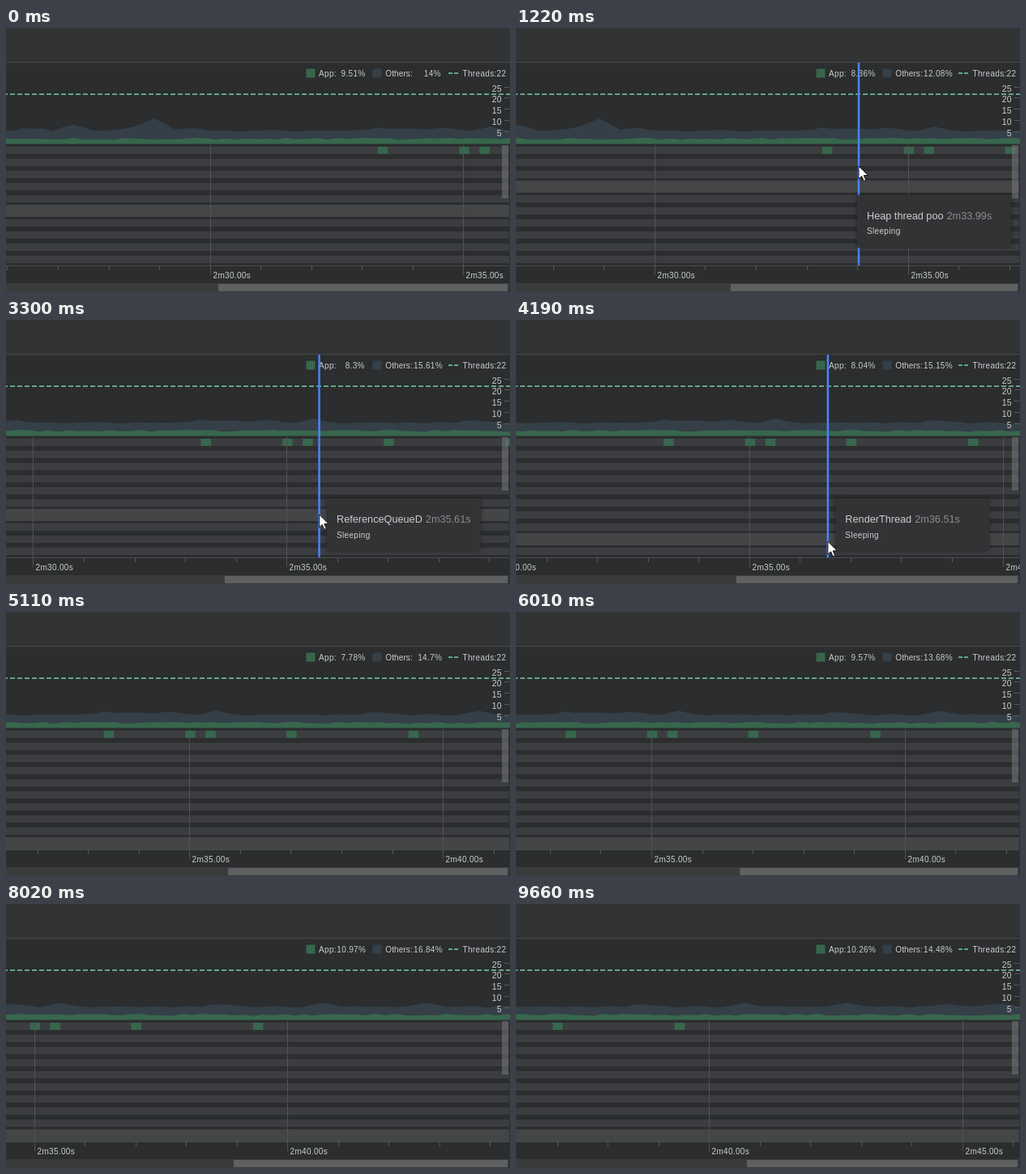
Animation, 622 px wide and 327 px high, one loop 9760 ms. Source, as an HTML page with a canvas:

```html
<!DOCTYPE html>
<html lang="en">
<head>
<meta charset="utf-8">
<title>Thread profiler</title>
<style>
html, body { margin: 0; width: 100%; height: 100%; overflow: hidden; background: #2b2d2e; }
canvas { display: block; }
</style>
</head>
<body>
<canvas id="stage" width="622" height="327"></canvas>
<script>
const ctx = document.getElementById('stage').getContext('2d');
const WIDTH = 622, HEIGHT = 327, LOOP = 9760;
const STEP = 58.9;                 // ms between picture changes
const SCROLL_SPEED = 0.06615;      // px per ms of playback
const SECOND = 62.55;              // px per second on the time axis
const MARK_35 = 564.4;             // where 2m35s starts
const BASE = 143.5, SAMPLE = 12.53;
const ROW_TOP = 144, ROW = 15, ROWS = 10;
const GREEN = '#37674d', OTHERS = '#353f48', DASH = '#62a583', TEXT = '#cbcdcf';

// Load peaks: sample number and rise in px.
const peaks = [[2, 4], [6, 9.5], [12, 7], [14, 18], [18, 4], [36, 4], [39, 4],
  [42, 4.5], [47, 6], [63, 4.5], [73, 4.5], [83, 6], [93, 5], [98, 4]];

// Time, App %, Others %.
const usage = [[0, 9.51, 14], [1200, 8.36, 12.08], [3200, 8.3, 15.61], [4800, 7.78, 14.7],
  [6800, 10.76, 13], [8000, 10.97, 16.84], [9600, 10.26, 14.48]];

// Time, cursor x, cursor y.
const pointerPath = [[180, 430, 240], [1000, 424, 217], [1220, 423, 171],
  [2200, 410, 180], [3300, 386.5, 241], [4650, 384, 292]];
const POINTER_START = 300, POINTER_END = 4650, HOVER_LAG = 120;

const activeSpans = [458.7, 559.3, 584.3, 684.3, 834.7];

const threads = ['main', 'Jit thread pool', 'Signal Catcher', 'Heap thread poo', 'FinalizerDaemon',
  'HeapTaskDaemon', 'ReferenceQueueD', 'FinalizerWatchd', 'RenderThread', 'Profile Saver'];

function interpolate(keys, t) {
  const next = keys.findIndex(key => key[0] > t);
  if (next < 1) return keys.at(next).slice(1);
  const [a, b] = [keys[next - 1], keys[next]];
  const k = (t - a[0]) / (b[0] - a[0]);
  return a.map((v, i) => v + (b[i] - v) * k).slice(1);
}

function noise(i, seed) {
  const n = Math.sin(i * 12.9898 + seed) * 43758.5453;
  return n - Math.floor(n);
}

function rect(color, x, y, w, h) {
  ctx.fillStyle = color;
  ctx.fillRect(x, y, w, h);
}

function text(value, x, y, { color = TEXT, size = 10, align = 'left', spacing = 0.33 } = {}) {
  ctx.font = `${size}px "Liberation Sans", Arial, sans-serif`;
  ctx.letterSpacing = spacing + 'px';
  ctx.textAlign = align;
  ctx.fillStyle = color;
  ctx.fillText(value, x, y);
  return ctx.measureText(value).width;
}

const appTop = i => 136 + 2.4 * noise(i, 4);

function othersTop(i) {
  const rises = peaks.map(([at, rise]) => rise * (1 - Math.abs(i - at) / 2.2));
  return 126.3 + 2.2 * noise(i, 9) - Math.max(0, ...rises) * 0.9;
}

function area(color, offset, topAt) {
  ctx.fillStyle = color;
  ctx.beginPath();
  ctx.moveTo(-20, BASE);
  for (let i = -1; i < 103; i++) ctx.lineTo(8 + i * SAMPLE - offset, topAt(i));
  ctx.lineTo(WIDTH + 20, BASE);
  ctx.fill();
}

function drawChart(offset) {
  area(OTHERS, offset, othersTop);
  area(GREEN, offset, appTop);
  for (let x = -4; x < 621; x += 9) rect(DASH, x, 81, 6, 2);
  for (let i = 0; i < 5; i++) {
    const y = Math.round(78.6 + 13.8 * i);
    text(String(25 - i * 5), 612, y, { size: 10.5, align: 'right' });
    rect('#5a5c5e', 615, y - 6, 6, 1);
  }
}

function drawLegend(t) {
  const slot = Math.floor(t / 400) * 400;
  const [app, others] = interpolate(usage, slot).map(v => +v.toFixed(2) + '%');
  rect(GREEN, 370.5, 50.5, 11, 11);
  text('App:', 386, 60);
  text(app, 440 + 0.7 * app.length, 60, { align: 'right' });
  rect(OTHERS, 452.5, 50.5, 11, 11);
  text('Others:', 468.3, 60, { spacing: 0.1 });
  text(others, 534.7 + 0.7 * others.length, 60, { align: 'right' });
  rect(DASH, 546, 55, 5, 2);
  rect(DASH, 553, 55, 5, 2);
  text('Threads:22', 563.5, 60);
}

function drawRows(offset, hovered) {
  for (let i = 0; i < ROWS; i++) {
    const y = ROW_TOP + i * ROW;
    rect('#3c3d40', 0, y + 3, 621, 9);
    if (i === hovered) rect('#444547', 0, y, 621, ROW);
  }
  for (const x of activeSpans) rect(GREEN, x - offset, 147, 12.5, 9);
}

function drawTimeAxis(offset) {
  rect('#4b4d4f', 0, 294, 621, 1);
  for (let s = 25; s <= 46; s++) {
    const x = Math.round(MARK_35 + (s - 35) * SECOND - offset);
    if (s % 5) {
      rect('#58595b', x, 295, 1, 5);
    } else {
      rect('#505254', x, 145, 1, 161);
      text(`2m${s}.00s`, x + 3.5, 310);
    }
  }
}

function drawScrollbars(t) {
  rect('rgba(120,121,122,0.55)', 612, 145, 8, 66);
  rect('#3a3b3d', 0, 316, 621, 11);
  const left = 262 + t * 0.00238;
  rect('#5f6062', left, 317, 619 - left, 9);
}

function drawTooltip(x, hoverY, row, offset) {
  const left = Math.min(x + 9.5, 421), top = Math.min(hoverY + 11, 221);
  const time = (34.962 + (x - MARK_35 + offset) / SECOND).toFixed(2);
  ctx.save();
  ctx.shadowColor = 'rgba(0,0,0,0.45)';
  ctx.shadowBlur = 5;
  rect('#323335', left, top, 190, 65);
  ctx.restore();
  const title = { size: 12.7, spacing: 0 };
  const width = text(threads[row], left + 12, top + 30, title);
  text(`2m${time}s`, left + 16 + width, top + 30, { ...title, color: '#8a8c8e' });
  text('Sleeping', left + 12, top + 48.5);
}

function drawCursor(x, y) {
  const arrow = [[0, 0], [0, 16], [3.7, 12.6], [6.3, 18.5], [8.8, 17.4], [6.3, 11.6], [11.4, 11.4]];
  ctx.beginPath();
  arrow.forEach(([dx, dy]) => ctx.lineTo(x + dx, y + dy));
  ctx.closePath();
  ctx.fillStyle = '#fff';
  ctx.fill();
  ctx.strokeStyle = '#111';
  ctx.lineWidth = 1;
  ctx.stroke();
}

function draw(t) {
  const offset = t * SCROLL_SPEED;
  const pointing = t >= POINTER_START && t < POINTER_END;
  const [x, y] = interpolate(pointerPath, t);
  const hoverY = interpolate(pointerPath, t - HOVER_LAG)[1];
  const hoverRow = Math.min(Math.floor((hoverY - ROW_TOP) / ROW), ROWS - 1);
  const idleRow = t < POINTER_START ? 5 : ROWS - 1;
  const row = pointing ? hoverRow : idleRow;

  rect('#2b2d2e', 0, 0, WIDTH, HEIGHT);
  rect('#323335', 0, 0, WIDTH, 42);
  rect('#454749', 0, 42, WIDTH, 1);
  drawChart(offset);
  drawLegend(t);
  drawRows(offset, row);
  drawTimeAxis(offset);
  drawScrollbars(t);
  if (pointing) {
    rect('#4a84f8', x - 1.25, 43, 2.5, 251);
    drawTooltip(x, hoverY, row, offset);
    drawCursor(x, y);
  }
}

const start = performance.now();
function frame() {
  const t = (performance.now() - start) % LOOP;
  draw(Math.min(t, Math.floor((t + 20) / STEP) * STEP));
  requestAnimationFrame(frame);
}
frame();
</script>
</body>
</html>
```
